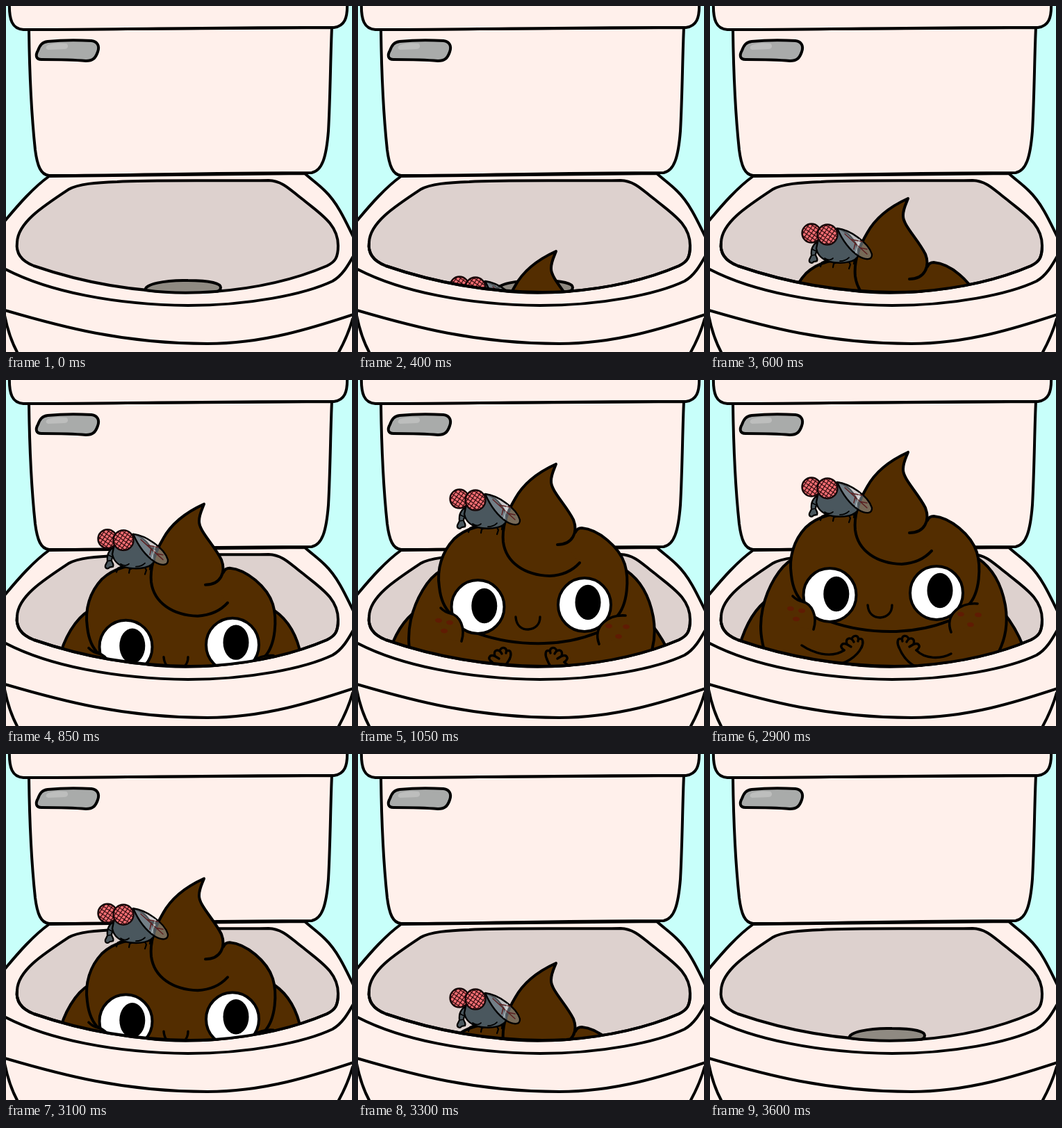
These frames come from a looping animation (498 px wide and 498 px high, 3700 ms). An HTML page with a canvas:

```html
<!DOCTYPE html>
<html lang="en">
<head>
<meta charset="utf-8">
<style>
html, body { margin: 0; width: 100%; height: 100%; overflow: hidden; background: #c8fffa; }
canvas { display: block; }
</style>
</head>
<body>
<canvas id="stage" width="498" height="498"></canvas>
<script>
const ctx = document.getElementById('stage').getContext('2d');
const LOOP = 3700, STEP = 50, DEPTH = 325;
const INK = '#000', CHINA = '#fff0eb', BROWN = '#532d00', SLATE = '#4a575e';

function shape(d, fill, line = INK, width = 4) {
  const path = new Path2D(d);
  if (fill) { ctx.fillStyle = fill; ctx.fill(path); }
  if (line) { ctx.strokeStyle = line; ctx.lineWidth = width; ctx.stroke(path); }
}

function oval(x, y, rx, ry, fill, line, width = 4, turn = 0) {
  ctx.beginPath();
  ctx.ellipse(x, y, rx, ry, turn, 0, Math.PI * 2);
  ctx.fillStyle = fill;
  ctx.fill();
  if (line) { ctx.strokeStyle = line; ctx.lineWidth = width; ctx.stroke(); }
}

// Front edge of the bowl opening, right to left
const FRONT = 'C478 362 474 368 462 374 C420 392 365 406 300 411 C200 416 110 398 40 374 C22 367 14 355 16 340';
const BOWL = 'M16 340 C17 312 52 289 90 264 C104 256 130 254 160 253 C210 250 300 252 378 251 ' +
  'C400 252 410 266 428 279 C452 299 478 314 478 345 ' + FRONT + ' Z';
const opening = new Path2D('M16 340 V-10 H478 V345 ' + FRONT + ' Z');

function drawToilet() {
  ctx.fillStyle = '#c8fffa';
  ctx.fillRect(0, 0, 498, 498);

  // Base, seat and rim
  ctx.fillStyle = CHINA;
  ctx.fillRect(0, 430, 498, 68);
  shape('M-3 440 C1 462 7 482 17 500 M478 500 C488 482 494 468 499 450');
  shape('M62 245 C40 261 20 283 -8 317 V436 C80 462 170 486 290 486 C370 486 440 464 506 442 V345 ' +
    'C490 312 478 284 459 266 C449 256 440 250 430 241 Z', CHINA);
  shape('M-6 376 C60 412 160 430 262 431 C350 431 430 415 470 396 C484 388 492 374 501 358');

  // Tank, lid and lever
  shape('M33 34 C34 110 37 160 42 207 C45 230 50 243 62 244 L88 244 C200 243 320 240 440 240 ' +
    'C455 237 461 218 464 180 C467 125 467 70 469 31 Z', CHINA);
  shape('M5 -5 C4 20 9 33 25 34 C170 34 320 30 472 31 C487 29 492 18 491 -5 Z', CHINA);
  shape('M60 51 C80 49 105 49 123 50 C132 51 135 58 132 66 C129 75 125 79 115 79 ' +
    'C93 77 72 77 51 77 C43 77 42 71 46 64 C49 56 52 52 60 51 Z', '#a9abaa');
  shape('M61 56 C68 53 78 53 87 54 C91 57 89 62 84 62 L61 63 C56 62 57 58 61 56 Z', '#bdbebd', null);

  shape(BOWL, '#ddd1ce');
  shape('M201 409 C198 401 228 394 262 395 C292 395 309 399 309 405 C309 409 306 411 301 411 C265 414 230 413 201 409 Z', '#8f8a82');
}

function drawFlyEye(x, y, r) {
  oval(x, y, r, r, '#f76f74', null);
  ctx.save();
  ctx.beginPath();
  ctx.arc(x, y, r, 0, 7);
  ctx.clip();
  ctx.translate(x, y);
  ctx.rotate(0.6);
  ctx.beginPath();
  for (let i = -15; i <= 15; i += 5) {
    ctx.moveTo(i, -20); ctx.lineTo(i, 20);
    ctx.moveTo(-20, i); ctx.lineTo(20, i);
  }
  ctx.strokeStyle = '#3a1013';
  ctx.lineWidth = 1.3;
  ctx.stroke();
  ctx.restore();
  ctx.beginPath();
  ctx.arc(x, y, r, 0, 7);
  ctx.strokeStyle = '#160708';
  ctx.lineWidth = 2.4;
  ctx.stroke();
}

function drawFly() {
  shape('M168 187 L161 190 L159 196 M184 189 L178 192 L177 197 M199 187 L202 193 L200 199 M208 185 L207 192', null, INK, 2.2);
  shape('M155 160 C147 165 145 172 146 180 L143 186 C142 191 147 192 149 189 L154 188 C156 184 152 182 152 179 C152 174 155 172 160 171 Z', SLATE, INK, 2.2);
  shape('M146 180 L152 179 M147 171 L153 174', null, INK, 1.6);
  shape('M155 160 C160 147 174 140 186 142 C202 147 214 165 214 179 C210 190 192 192 177 190 C164 188 155 181 153 170 Z', SLATE, INK, 2.4);
  shape('M165 184 C170 188 175 186 177 184 M187 188 C194 188 198 185 200 183', null, INK, 1.8);
  shape('M183 141 C201 143 228 161 233 178 C234 187 224 187 214 181 C199 171 190 157 183 141 Z',
    'rgba(155,168,176,.5)', INK, 2.4);
  shape('M194 149 L226 178 M203 157 L219 160 M209 162 L207 171 M216 169 L226 171', null, '#5b2021', 1.5);
  shape('M215 157 L210 176', null, 'rgba(225,232,235,.45)', 2);
  drawFlyEye(146, 148, 13.5);
  drawFlyEye(169, 150, 14.5);
}

function drawEye(x, y, px, py) {
  oval(x, y, 38, 38.5, '#fff', INK);
  oval(px, py, 18.5, 25.2, '#000');
}

function drawHand() {
  shape('M193 383 C185 377 190 371 198 375 L203 378 M197 374 C194 365 203 363 207 371 ' +
    'M204 367 C206 360 216 361 213 370 M214 367 C221 364 221 373 218 379', null, INK, 3.4);
}

function drawArms() {
  drawHand();
  ctx.save();
  ctx.translate(490, 0);
  ctx.scale(-1, 1);
  drawHand();
  ctx.restore();
  shape('M132 376 C147 386 173 396 193 383 M218 379 C212 391 196 404 172 406', null, INK, 3.4);
  shape('M347 388 C332 396 309 396 297 383 M272 379 C278 394 290 408 312 412', null, INK, 3.4);
}

function drawPoop() {
  // Lower coils
  shape('M86 308 C64 322 50 350 42 378 L60 430 H435 L451 378 C444 360 436 345 422 328', BROWN);
  shape('M120 251 C100 262 83 292 76 322 C70 350 74 370 80 390 L90 440 H400 L407 400 ' +
    'C424 375 430 347 425 318 C420 291 408 266 386 251', BROWN);

  // Head
  shape('M210 187 C180 183 155 190 138 206 C121 224 113 249 117 275 C119 293 124 305 133 313 L190 348 ' +
    'C240 360 300 357 343 340 L372 318 C388 300 390 262 384 242 C376 217 346 191 321 190 L313 196 Z', BROWN, null);
  shape('M209 187 C180 183 155 190 138 206 C121 224 113 249 117 275 C119 293 124 305 134 314');
  shape('M313 196 C315 191 318 190 322 190 C346 192 376 217 384 242 C390 262 389 300 372 318');

  // Curl on top
  const sweep = 'M319 240 C309 251 295 258 276 259 C240 258 213 240 209 210 C207 190 213 170 226 148 ' +
    'C239 124 263 108 285 98 C282 106 278 113 278 122 C277 136 299 156 310 178 ';
  shape(sweep + 'C317 196 309 209 298 213 Z', BROWN, null);
  shape(sweep + 'C317 196 309 214 287 214');

  // Face
  shape('M173 342 C205 353 235 357 268 356 C298 355 323 349 343 341');
  drawEye(172.5, 303.5, 181.8, 302);
  drawEye(326, 300.5, 331, 297);
  shape('M227 318 C228 331 236 336 245 336 C255 335 262 329 262 318', null, INK, 3.4);

  // Cheeks
  shape('M119 303 C122 310 127 313 133 313 C147 316 156 334 149 353 L130 350 L112 320 Z', BROWN, null);
  shape('M119 305 C124 310 128 312 133 313 C147 316 155 334 149 353', null, INK, 3.6);
  shape('M386 315 C362 314 337 328 347 358 L370 350 L388 330 Z', BROWN, null);
  shape('M385 316 C362 314 337 330 347 357', null, INK, 3.6);
  for (const [x, y] of [[116, 323], [132, 326], [124, 338], [361, 331], [386, 332], [375, 346]])
    oval(x, y, 5, 3.3, '#5f1c03', null, 0, 0.1);

  drawArms();
  drawFly();
}

const ease = p => (1 - Math.cos(Math.PI * Math.min(1, Math.max(0, p)))) / 2;

// Distance below the resting pose
function sink(t) {
  if (t < 1250) return DEPTH * (1 - ease((t - 17) / 1247));
  if (t < 2900) return 0;
  return DEPTH * ease((t - 2830) / 810);
}

function draw(now) {
  const t = Math.floor((now % LOOP) / STEP) * STEP;
  const drop = sink(t);
  ctx.lineJoin = ctx.lineCap = 'round';
  drawToilet();
  if (drop < 315) {
    ctx.save();
    ctx.clip(opening);
    ctx.translate(0, drop);
    drawPoop();
    ctx.restore();
    shape('M478 345 ' + FRONT);
  }
}

const start = performance.now();
function tick() {
  draw(performance.now() - start);
  requestAnimationFrame(tick);
}
tick();
</script>
</body>
</html>
```
